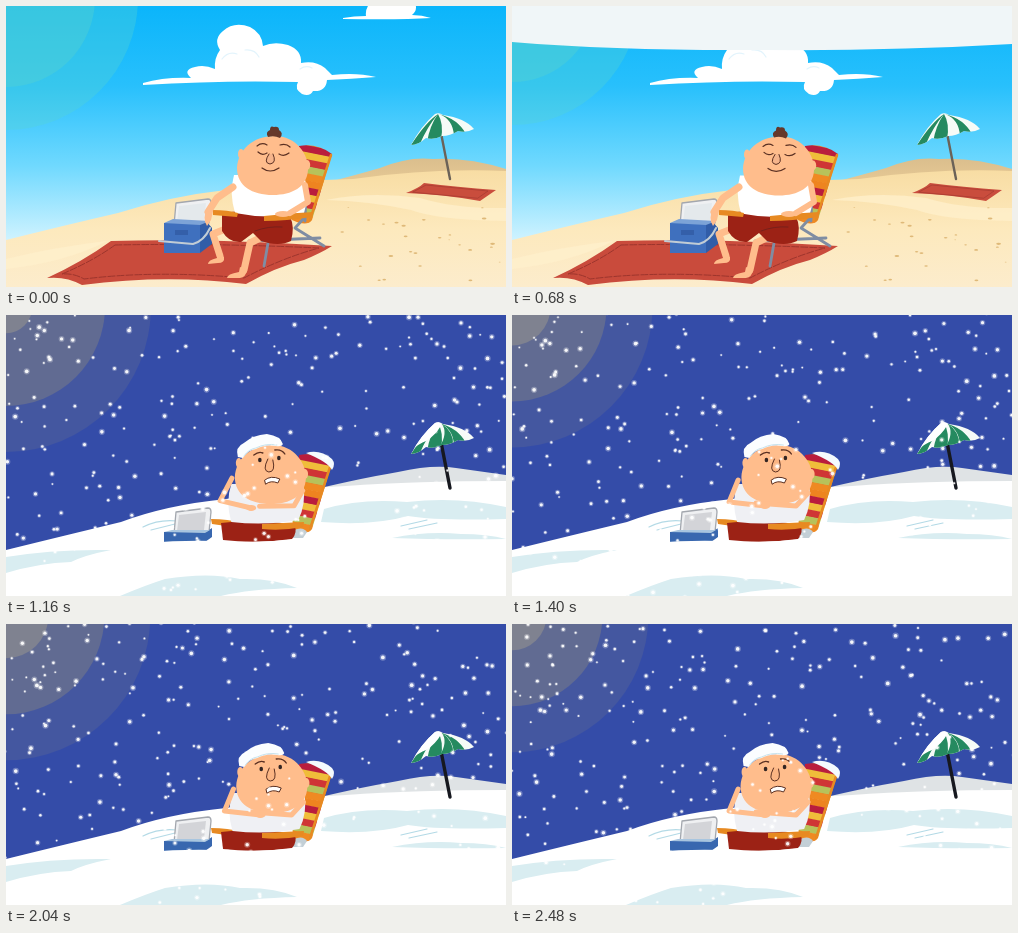
Animation of 500 by 281 pixels, one loop 2.52 s. Source, as an HTML page with a canvas:

```html
<!DOCTYPE html>
<html lang="en">
<head>
<meta charset="utf-8">
<title>Beach to blizzard</title>
<style>
html, body { margin: 0; width: 100%; height: 100%; overflow: hidden; background: #344ca8; }
canvas { display: block; width: 100vw; height: 100vh; }
</style>
</head>
<body>
<canvas id="stage"></canvas>
<script>
const W = 500, H = 281, LOOP = 2520, STEP = 40;
const cv = document.getElementById('stage');
const c = cv.getContext('2d');
const SKIN = '#ffbd8c', LINE = '#5b3022', SHORTS = '#9c2215', METAL = '#7f8da3', WOOD = '#e78a22';

const clamp = v => Math.max(0, Math.min(1, v));
const ease = (t, a, b) => { const u = clamp((t - a) / (b - a)); return u * u * (3 - 2 * u); };
const mix = (a, b, u) => a + (b - a) * u;

function shape(d, fill, stroke, w = 1) {
  const p = new Path2D(d);
  if (fill) { c.fillStyle = fill; c.fill(p); }
  if (stroke) { c.strokeStyle = stroke; c.lineWidth = w; c.stroke(p); }
}
function oval(x, y, rx, ry, fill) {
  c.beginPath();
  c.ellipse(x, y, rx, ry, 0, 0, 7);
  c.fillStyle = fill;
  c.fill();
}
function moved(x, y, draw) {
  c.save();
  c.translate(x, y);
  draw();
  c.restore();
}
function clipped(d, draw) {
  c.save();
  c.clip(new Path2D(d));
  draw();
  c.restore();
}
function fade(y0, y1, ...cols) {
  const g = c.createLinearGradient(0, y0, 0, y1);
  cols.forEach((k, i) => g.addColorStop(i / (cols.length - 1), k));
  return g;
}

let seed = 17;
const rnd = () => (seed = seed * 16807 % 2147483647) / 2147483647;
const flakes = Array.from({ length: 330 }, () => ({
  x: rnd() * W, y: rnd() * 290, r: 0.8 + rnd() * 1.1, v: 35 + rnd() * 45, p: rnd() * 6.28
}));
const specks = Array.from({ length: 26 }, () => [335 + rnd() * 160, 200 + rnd() * 75, 0.6 + rnd() * 0.9]);

function chairBack() {
  const cols = ['#ee8420', '#b91d3d', '#f0bd3a', '#cf3535', '#b7c25a', '#ef8a22'];
  clipped('M293 140Q311 137 326 148L306 214Q301 221 286 214Z', () => {
    for (let i = 0; i < 14; i++) {
      const y = 128 + i * 7;
      shape(`M280 ${y}L335 ${y + 11}V${y + 18.5}L280 ${y + 7.5}Z`, cols[i % 6]);
    }
  });
  shape('M325 149L304 214', null, WOOD, 2.5);
}

function umbrella(snowy) {
  shape('M435 127L444 173', null, snowy ? '#16181f' : '#6b6258', snowy ? 3.4 : 2.4);
  const top = 'M405 139Q415 120 429 108Q433 106 437 109Q459 112 468 123Q461 127 452 125Q444 130 436 130Q428 134 420 132Q412 139 405 139Z';
  const green = '#258a60';
  shape(top, '#f6fbf7');
  clipped(top, () => {
    shape('M432 108Q420 116 405 139L413 140Q421 121 432 108Z', green);
    shape('M432 108Q424 119 421 136L435 133Q438 118 432 108Z', green);
    shape('M433 108Q447 113 448 130L460 128Q452 113 433 108Z', green);
    if (!snowy) return;
    shape('M402 138L428 103L436 109Q429 121 420 126Q412 129 402 138Z', '#fff');
    shape('M436 109Q442 118 434 131L447 130Q448 117 436 109Z', green);
  });
}

function limb([a, b, d], w = 6) {
  shape(`M${a}L${b}L${d}`, null, SKIN, w);
}

function sun(t, cols, radii) {
  const s = Math.sin(t / 150) * 5;
  radii.forEach((r, i) => oval(0, -8, Math.max(0, r + s), Math.max(0, r + s), cols[i]));
}

function cloud(t) {
  moved(t / 680, 0, () => {
    shape('M137 77Q158 71 185 72Q176 64 189 61Q198 58 209 63Q208 52 214 44Q207 33 217 25Q228 15 244 21Q256 27 257 40Q268 35 282 39Q296 44 295 57Q309 54 319 62L326 69Q350 66 370 71Q345 73 321 74Q320 86 307 85Q304 91 296 88Q288 83 292 76Q218 74 137 79Z', '#fff');
    shape('M216 53Q222 45 231 48M239 44Q249 43 253 51M294 63Q300 59 306 62', null, '#e3f4fc', 1.2);
  });
  shape('M337 12Q348 10 360 10Q359 3 364 -3H409Q412 4 406 9Q416 9 425 12Q395 14 337 13Z', '#fff');
}

function coolerLid(fill) {
  shape('M170 197L202 193Q205 193 205 197L203 217L168 219Z', '#eff0f2', '#a3a7ae', 1.3);
  shape('M173 200L200 197L198 215L171 216Z', fill);
}

function cooler() {
  coolerLid('#e4e9ec');
  shape('M158 217L201 216L206 222V238L194 247L158 245Z', '#315da8');
  shape('M158 217H194V247H158Z', '#3f70be');
  shape('M158 217L167 213L204 215L194 219Z', '#7ca3d7');
  shape('M169 224H182V229H169Z', '#345fa9');
  shape('M153 235L187 238Q198 235 204 222', null, '#c1ccd5', 2);
}

function towels() {
  shape('M400 187Q413 182 418 177Q450 181 490 184L474 195Q435 188 400 187Z', '#c94d3d');
  shape('M407 186L420 179L482 185L472 192Z', null, '#a53b31', 0.7);
  shape('M105 235Q200 232 326 240Q315 247 298 254Q270 261 240 278Q160 268 76 279Q60 270 41 272Q76 256 105 235Z', '#c94b3c');
  c.setLineDash([7, 2]);
  shape('M109 239Q205 237 313 242Q276 252 238 272Q150 264 78 273Q68 267 56 268Q87 255 109 239Z', null, '#9d352d', 1);
  c.setLineDash([]);
}

function head() {
  oval(301, 159, 3.2, 5, SKIN);
  oval(235, 148, 3, 5, SKIN);
  shape('M268 130C291 130 303 149 302 164C301 181 286 189 267 189C246 189 231 180 231 162C232 144 247 130 268 130Z', SKIN);
}

function summerMan(t) {
  const b = Math.sin(t / 330) * 0.5;
  chairBack();
  shape('M300 210L289 222L318 240M266 214L258 260M243 235L314 232M300 188L299 215', null, METAL, 2.8);
  limb(['222,222', '207,228', '214,250'], 7);
  shape('M211 247L218 251Q219 257 212 257L202 258Q202 254 211 252Z', SKIN);
  limb(['262,228', '244,237', '238,264'], 7);
  shape('M234 261L241 264Q240 271 234 272L221 272Q221 268 233 266Z', SKIN);
  shape('M216 208Q241 201 284 211Q289 220 285 235Q273 241 255 235L247 227L235 236Q223 237 216 225Z', SHORTS);
  shape('M249 225Q262 220 276 221', null, '#78201a', 1);
  moved(0, b, () => {
    shape('M228 169Q223 187 229 207Q264 214 298 207Q304 190 298 169Z', '#fff');
    head();
    shape('M262 131Q259 126 264 124Q264 119 268 121Q273 120 273 124Q278 127 274 132Q268 129 262 131Z', '#65382a');
    shape('M252 146Q256 150 261 147M273 148Q278 151 283 147M251 140Q256 136 261 139M274 139Q280 137 284 141', null, LINE, 1.2);
    shape('M263 148Q257 157 264 158Q271 157 267 148', '#f5b48b', LINE, 1);
    shape('M256 162Q264 168 273 162', null, LINE, 1.2);
  });
  shape('M207 204Q222 204 232 207L231 211L207 209ZM258 210Q285 207 307 206L306 211Q280 215 258 215Z', WOOD);
  limb(['227,181', '211,192', '202,206'], 7);
  shape('M201 203Q196 213 201 220L205 214L207 205Z', SKIN);
  limb(['299,179', '302,196', '284,207'], 6);
  oval(277, 208, 8, 3, SKIN);
}

function summer(t) {
  c.fillStyle = fade(0, 240, '#0bb5fb', '#28c0fc', '#70d9fe', '#d7f5ff');
  c.fillRect(0, 0, W, H);
  sun(t, ['rgba(85,211,208,.34)', 'rgba(93,211,200,.32)'], [132, 89]);
  cloud(t);
  shape('M315 178Q350 169 374 162Q403 150 427 153Q462 151 500 163V195H315Z', fade(150, 190, '#d9bd8c', '#edcf99'));
  shape('M0 234Q60 219 112 207Q165 190 220 184Q290 174 347 173Q425 162 500 165V281H0Z', fade(165, 281, '#f8dda4', '#fde9bd', '#fceccc'));
  shape('M320 194Q365 185 414 192Q450 203 500 202V215Q431 214 405 204Q363 195 320 194ZM0 253Q49 241 101 235Q61 256 0 263Z', 'rgba(255,240,204,.75)');
  specks.forEach(([x, y, r]) => oval(x, y, r * 1.6, r * 0.7, '#dfb979'));
  umbrella(false);
  towels();
  cooler();
  summerMan(t);
}

function winterMan(t) {
  const k = 1 - ease(t, 920, 1160), a = ease(t, 960, 1240);
  const shiver = a * Math.sin(t / 19) * 0.9, sway = a * Math.sin(t / 210) * 0.8;
  moved(2 * k, -4 * k, () => {
    chairBack();
    shape('M300 138Q314 134 326 144Q330 149 326 155Q322 147 300 138Z', '#f4fafd');
  });
  shape('M288 215Q297 211 301 217L297 223H285Z', '#c3cfd6');
  shape('M205 204Q222 204 236 208L234 213L206 209Z', WOOD);
  shape('M215 208Q252 203 288 210Q292 217 286 224Q250 229 217 225Z', SHORTS);
  shape('M256 209L298 207L297 212Q276 216 256 214Z', WOOD);
  moved(shiver, 0, () => {
    shape('M226 169Q220 187 226 207Q260 211 293 205Q301 189 298 169Z', '#eff0f4');
    moved(sway - 1, -6 * k, () => {
      head();
      moved(-2 * k, -4 * k, () => {
        shape('M234 142Q231 132 240 128Q249 120 263 119Q277 121 279 129Q278 132 272 131Q261 129 252 134Q244 135 239 143Z', '#fbfdff');
        shape('M240 141Q245 134 252 133Q262 128 273 130', null, '#c8e4ee', 1);
      });
      shape('M250 140Q255 136 259 138M271 135Q278 134 281 139', null, LINE, 1.4);
      oval(256, 145, 1.8, 2.3, '#332523');
      oval(275, 143, 1.8, 2.3, '#332523');
      shape('M264 144Q258 156 265 157Q272 157 269 145', '#fbb583', LINE, 1);
      shape('M261 165Q267 160 276 164L274 168Q267 165 262 169Z', '#fff', LINE, 1);
    });
  });
  const joint = (x, y, X, Y) => [mix(x, X, a) + shiver, mix(y, Y, a)];
  const hand = joint(213, 201, 254, 191);
  limb([joint(225, 156, 227, 165), joint(202, 180, 218, 187), hand], 5);
  limb([joint(299, 166, 297, 178), joint(304, 190, 285, 191), joint(292, 205, 245, 188)], 5);
  oval(...hand, 5, 3, SKIN);
}

function winter(t) {
  const k = 1 - ease(t, 920, 1120);
  c.fillStyle = '#344ca8';
  c.fillRect(0, 0, W, H);
  sun(t, ['#4457a0', '#616b92', '#7f8290'], [140, 94, 38 * ease(t, 880, 1400)]);
  moved(0, -7 * k, () => {
    shape('M285 180Q350 164 392 157Q427 149 450 153L500 160V220H285Z', '#dfe3e5');
    shape('M0 235Q65 219 115 207Q160 190 220 184Q285 173 340 171Q410 166 500 166V300H0Z', '#fff');
  });
  const ice = '#d9edf1';
  shape('M318 194Q355 183 401 187Q451 181 500 192V204Q432 206 402 201Q367 211 315 207Z', ice);
  shape('M0 242Q47 234 105 235Q79 240 65 247Q33 248 0 258Z', ice);
  shape('M114 281Q140 270 159 264Q202 257 234 264Q268 263 291 273Q243 274 215 281Z', ice);
  shape('M386 223Q420 216 455 219Q481 219 500 224Q439 225 386 223Z', ice);
  shape('M137 212Q153 204 171 206M145 215L169 209M395 211L421 205M403 214L431 208', null, '#b4dae6', 1.2);
  moved(12 * k, -10 * k, () => umbrella(true));
  moved(-8 * k, -5 * k, () => {
    coolerLid('#d3d4d8');
    shape('M158 217H200L206 213V222L199 227H158Z', '#3867af');
    shape('M158 217L166 215H204L199 218Z', '#a8c5df');
  });
  winterMan(t);
  shape('M140 228Q176 225 210 226Q252 229 299 223Q318 226 335 228Q245 237 140 228Z', '#fff');
  snow(t);
}

function snow(t) {
  for (const f of flakes) {
    const y = (f.y + f.v * t / 1000) % 290 - 4;
    const x = f.x + Math.sin(t / 500 + f.p) * 3;
    oval(x, y, f.r * 1.7, f.r * 1.7, 'rgba(255,255,255,.28)');
    oval(x, y, f.r, f.r, 'rgba(255,255,255,.92)');
  }
}

// Falling slab of snow that hides the change of season.
function slab(t) {
  const fall = clamp((t - 640) / 120);
  const low = fall * 300 - 62 * clamp(1 - Math.abs(t - 680) / 40);
  const high = t < 760 ? -20 : 310 * ease(t, 760, 880) - 20;
  shape(`M0 ${high}Q250 ${high + 8} 500 ${high}V${low}Q380 ${low + 7} 250 ${low + 6}Q110 ${low + 7} 0 ${low - 2}Z`, '#f0f6f8');
}

function draw(t) {
  const d = devicePixelRatio || 1;
  const pw = Math.round(innerWidth * d), ph = Math.round(innerHeight * d);
  if (cv.width !== pw || cv.height !== ph) { cv.width = pw; cv.height = ph; }
  c.setTransform(pw / W, 0, 0, ph / H, 0, 0);
  c.lineCap = c.lineJoin = 'round';
  if (t < 760) summer(t); else winter(t);
  if (t >= 640 && t < 880) slab(t);
}

const start = performance.now();
function tick() {
  const t = (performance.now() - start) % LOOP;
  draw(Math.floor(t / STEP) * STEP);
  requestAnimationFrame(tick);
}
tick();
</script>
</body>
</html>
```
